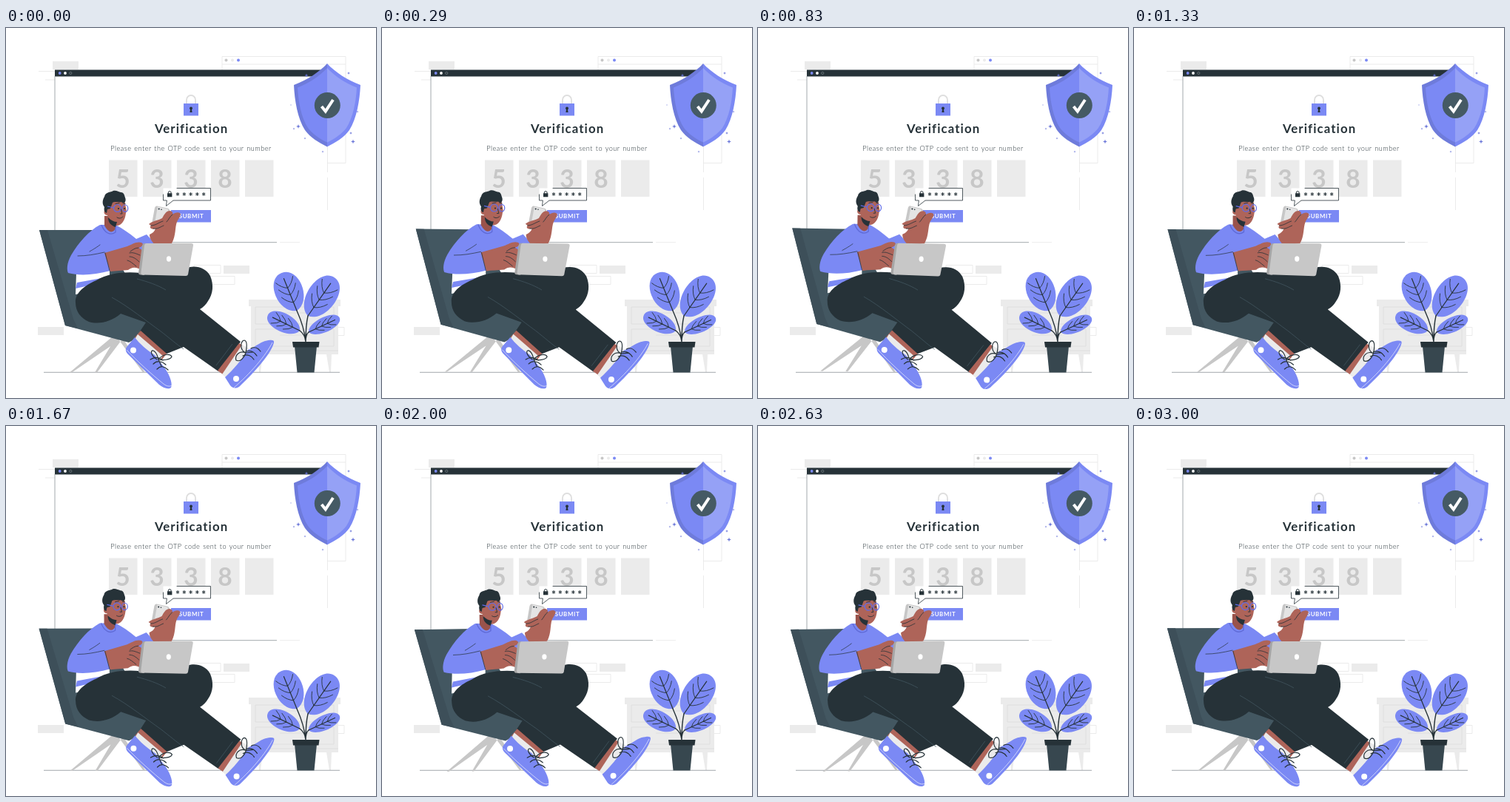
An HTML page for the animation above (3.04 s loop, 500 by 500 pixels).

```html
<!DOCTYPE html>
<html lang="en">
<head>
<meta charset="utf-8">
<title>Verification</title>
<style>
html, body { margin: 0; width: 100%; height: 100%; overflow: hidden; background: #fff; }
svg { display: block; width: 100vw; height: 100vh; font-family: Quicksand, Lato, sans-serif; }
text { text-anchor: middle; }
.blue { fill: #7b89f4; }
.dark { fill: #263238; }
.pale { fill: #ebebeb; }
.skin { fill: #ae6459; }
.slate { fill: #435761; }
.line { fill: none; stroke: #263238; stroke-linecap: round; stroke-linejoin: round; }
.thin { fill: none; stroke: #e6e6e6; stroke-width: .8; }
.title { font-size: 16.8px; font-weight: 700; letter-spacing: 1.1px; }
.hint { font-size: 9.2px; font-weight: 300; letter-spacing: .5px; word-spacing: .8px; }
.digit { font-size: 33.5px; font-weight: 700; fill: #c7c7c7; }
.submit { font-size: 7.900px; font-weight: 700; letter-spacing: .6px; fill: #fff; }
</style>
</head>
<body>
<svg viewBox="0 0 500 500">
  <!-- browser windows -->
  <path class="pale" d="M63 45h35v11H63z"/>
  <path class="thin" d="M44 58.500h22M53 70h13M292 38.500h167v144H292zM292 49h167"/>
  <circle cx="297.500" cy="43.500" r="2" fill="#c7c7c7"/>
  <circle cx="306" cy="43.500" r="2" class="pale"/>
  <circle cx="314" cy="43.500" r="2" class="blue"/>
  <path fill="#fff" d="M66 57h368v233H66z"/>
  <path class="dark" d="M66 56.500h368v9H66z"/>
  <circle cx="72.700" cy="61" r="1.900" class="blue"/>
  <circle cx="80" cy="61" r="1.900" fill="#fff"/>
  <circle cx="87.300" cy="61" r="1.600" fill="none" stroke="#7b878d" stroke-width=".7"/>
  <path d="M66 65V289.700H366" fill="none" stroke="#8b9297" stroke-width=".8"/>
  <path class="thin" d="M370 289.700H397M434.500 66V195M434.500 202V246"/>

  <!-- form -->
  <path d="M244 103V97a6 6 0 0 1 12 0v6" fill="none" stroke="#dedede" stroke-width="1.800"/>
  <path class="blue" d="M240 102h20v16.500h-20z"/>
  <path class="dark" d="M249.200 109h1.600l.8 5h-3.200z"/>
  <circle cx="250" cy="108.500" r="2" class="dark"/>
  <text class="title dark" x="250.600" y="141.500">Verification</text>
  <text class="hint dark" x="250" y="166.300">Please enter the OTP code sent to your number</text>
  <g id="code"></g>
  <path class="blue" d="M223 246h54v16.500h-54z"/>
  <text class="submit" x="250.500" y="257.200">SUBMIT</text>
  <path fill="#fff" d="M212.500 216.500h64V233H226l-9.500 7.500.8-7.500h-4.800z"/>
  <path class="line" stroke-width=".8" d="M231 216.500h45.500V233H226l-9.500 7.500.8-7.500h-4.800v-8"/>
  <path class="line" d="M219.300 224v-1.500a1.900 1.900 0 0 1 3.800 0v1.500"/>
  <path class="dark" d="M218 223.300h6.400v5H218z"/>
  <g id="stars" class="line"></g>

  <!-- shield -->
  <path fill="#6e7bdb" d="M434 48C423 60 407 70 389 77C390 98 394 122 404 138C411 148 423 155 434 160.500z"/>
  <path class="blue" d="M434 48C445 60 461 70 479 77C478 98 474 122 464 138C457 148 445 155 434 160.500z"/>
  <path class="blue" d="M434 54C424 65 410 74 394 80.500C395 100 399 121 408 135C414 143 424 150 434 154.500z"/>
  <path fill="#95a1f6" d="M434 54C444 65 458 74 474 80.500C473 100 469 121 460 135C454 143 444 150 434 154.500z"/>
  <circle cx="434.300" cy="104.500" r="17.500" fill="#455a64"/>
  <path d="M426.500 106l5.300 6.500L442 97" fill="none" stroke="#fff" stroke-width="4"/>
  <g id="sparks" fill="#6874d8"></g>

  <!-- room -->
  <path class="thin" d="M254 320.500h36v11h-36zM250 335.500h59v11h-59zM446 404.500h11v11h-11z"/>
  <path class="pale" d="M294 321h35v11h-35zM43 404h35v11H43zM328 367h124v9h-3v65H331v-65h-3zM340 441h7l-3 24h-2zM433 441h7l-1 24h-2z"/>
  <path d="M337 377h106v23H337zM337 407h106v23H337zM370 385h40M370 415h40M331 436h118" fill="none" stroke="#dcdcdc" stroke-width=".8"/>
  <path d="M51 465.300h400" stroke="#8b9297" stroke-width=".8"/>
  <g id="plant"></g>
  <path fill="#37474f" d="M390 430h30l-3.500 35.500h-23z"/>
  <path class="dark" d="M387 424h36.500l-1 7.500H388z"/>

  <g id="rock">
    <!-- chair -->
    <path fill="#c7c7c7" d="M144 417L86 465.500h3L153 422zM149 417L120 465.500h3L156 422zM150 418h7L188 465.500h-3z"/>
    <path class="slate" d="M45 273H126L190 380V412L166 425L80 402z"/>
    <path fill="#3d4f59" d="M45 273H56L91 393L97 406L80 402z"/>

    <!-- far arm with phone -->
    <path class="blue" d="M160 292L190 279L203 293L196 312H160z"/>
    <path fill="#c7c7c7" d="M204 240.500L218 243.500Q222 244.500 221 248L212 274L196 270L201 243Q202 240 204 240.500z"/>
    <path fill="#e4e4e4" d="M205 241.500L218 244.500Q220 245 219 248L211 272L200 269z"/>
    <circle cx="206.700" cy="244.500" r="1.100" class="dark"/>
    <circle cx="210" cy="245.300" r=".8" class="dark"/>
    <path class="skin" d="M193 265C197 261 206 260 211 257C214 252 216 247 222 247C225 248 226 250 225 252C229 249 235 248 236 252C235 256 232 259 231 262C228 270 230 280 224 291L202 294C197 288 194 285 194 279C199 277 201 274 202 271C197 273 193 270 196 267z"/>
    <path class="line" d="M196 267C202 267 206 263 212 261M199 271C205 272 208 269 213 267M225 252C221 255 220 259 217 262" stroke-width=".8"/>

    <!-- torso and head -->
    <path fill="#fff" d="M95 331L140 325V352L94 360z"/>
    <path class="blue" d="M96 344L140 336V342L94 352z"/>
    <path class="blue" d="M127 266C112 274 98 290 88 307C82 318 82 327 84 331C99 335 119 334 141 328L188 318L192 294L176 285C166 277 158 271 148 266z"/>
    <path fill="#9a534b" d="M133 254H149L148 271C145 277 139 278 133 267z"/>
    <path d="M129 266C133 277 141 281 148 276V268" fill="none" stroke="#5e6ad7" stroke-width="1.300"/>
    <path class="skin" d="M137 237C145 231 157 231 161 236C161 241 164 247 162 250C161 260 156 267 150 267C143 267 138 260 137 253C132 253 131 247 135 245z"/>
    <path class="dark" d="M138 256C142 260 146 262 150 262L148 269C142 267 138 263 138 256z"/>
    <path class="dark" d="M133 242C129 237 131 231 133 228C134 222 140 222 143 221C147 218 152 221 155 222C160 222 160 227 161 229C163 234 160 239 156 235C152 236 147 234 144 236L141 244L137 245L136 250C133 249 132 246 133 242z"/>
    <g fill="none" stroke="#5f6be8" stroke-width="1.200">
      <circle cx="150.500" cy="243.500" r="5"/>
      <ellipse cx="161" cy="243.700" rx="3.800" ry="4.700"/>
      <path d="M145.500 243L137 241"/>
    </g>
    <circle cx="152" cy="244" r="1.100" class="dark"/>
    <circle cx="160" cy="244" r="1.100" class="dark"/>
    <path class="line" d="M148 237.500L153 236.500M158 237L161 237.500M155.500 245L157 251L154.500 251M150 256C153 258 156 257 158 255" stroke-width=".9"/>

    <!-- legs -->
    <path class="dark" d="M182 331L244 324C257 320 270 324 276 335C281 347 280 359 273 369Q269 376 262 380L317 424L287 464L240 431L215 441L181 410L189 398L155 386C142 397 126 401 112 397C101 392 94 383 94 371C93 358 106 348 122 341C139 331 160 329 182 331z"/>
    <path d="M143 364C165 376 191 397 208 409C221 419 230 427 240 434M177 339C192 343 204 347 216 354M306 427L284 456" fill="none" stroke="#455a64" stroke-width=".7"/>

    <!-- near arm and laptop -->
    <path class="skin" d="M133 304L164 295C171 292 177 288 183 290C187 292 184 296 179 297C186 300 188 306 186 310L184 328C176 322 170 323 165 327C157 328 148 328 141 329z"/>
    <path class="line" d="M179 297C174 297 171 300 168 302M181 307C174 304 171 303 167 304M180 316C175 311 171 309 167 309M176 322C171 318 168 315 164 314M134 304L140 328" stroke-width=".8"/>
    <path class="line" d="M97 308C109 308 120 306 133 303M113 302C120 298 123 296 127 293" stroke-width=".7"/>
    <path fill="#a6a6a6" d="M190 291H187Q185 291 184 294L179 331Q179 333 182 333.500L187 334z"/>
    <path fill="#c7c7c7" d="M190 291H250Q253.500 291 253 294L246 333Q245.500 335 243 335L184 333.500Q182 333 182.500 330L187 294Q187.500 291 190 291z"/>
    <ellipse cx="220" cy="312" rx="3.100" ry="3.700" fill="#fff"/>

    <!-- shoes -->
    <path class="skin" d="M182 409L217 440L211 448L174 418z"/>
    <path fill="#ebebeb" d="M178 414L212 443L204 455L172 424z"/>
    <path class="blue" d="M174 418C180 426 190 435 201 442L215 460C223 472 225 482 223 486C219 489 212 486 207 482L165 441C161 437 161 433 164 430z"/>
    <path d="M163 435C177 450 198 469 213 481C217 484 221 485 224 483" fill="none" stroke="#fff" stroke-width=".6"/>
    <circle cx="172" cy="435.500" r="4" fill="#fff"/>
    <path class="line" d="M195 448C201 444 207 445 212 449M199 454C204 449 211 450 216 455M204 461C209 456 214 457 219 462M204 448C195 442 195 435 199 436C204 438 205 445 206 448C212 440 222 440 224 444C222 449 211 449 206 448L210 457" stroke-width="1.200"/>

    <path class="skin" d="M315 426L320 429L293 468L286 463z"/>
    <path fill="#ebebeb" d="M319 428L330 434L301 475L292 468z"/>
    <path class="blue" d="M327 435C335 432 343 425 350 423C358 421 363 421 362 425C359 439 338 463 316 484C311 488 306 487 303 483L296 472C307 462 318 449 327 435z"/>
    <path d="M308 486C329 468 351 443 360 425" fill="none" stroke="#fff" stroke-width=".6"/>
    <circle cx="311" cy="474" r="4" fill="#fff"/>
    <path class="line" d="M320 443C326 440 332 443 335 448M324 437C330 435 335 437 339 443M331 433C336 430 341 433 344 437M324 439C315 435 317 422 322 422C327 423 325 434 324 439C315 435 309 443 311 449C317 452 322 445 324 439L334 438" stroke-width="1.200"/>
  </g>
</svg>
<script>
const $ = id => document.getElementById(id);

$("code").innerHTML = ["5", "3", "3", "8", ""].map((digit, i) => {
  const x = 139 + 46 * i;
  return `<path class="pale" d="M${x} 178.500h38.500V228h-38.500z"/>
    <text class="digit" x="${x + 19}" y="215.800">${digit}</text>`;
}).join("");

$("stars").innerHTML = [0, 1, 2, 3, 4].map(i =>
  `<path transform="translate(${232 + 8.8 * i} 224.500)" d="M0-2V2M-1.800-1L1.800 1M-1.800 1L1.800-1"/>`
).join("");

const spark = ([x, y, r]) =>
  `<path transform="translate(${x} ${y}) scale(${r})" d="M0-1L.25-.25L1 0L.25.25L0 1L-.25.25L-1 0L-.25-.25z"/>`;
$("sparks").innerHTML = [
  [463, 61, 2], [406, 64, 2.5], [475, 113, 1.5], [466, 142, 2], [469, 153.5, 3],
  [395, 133, 3], [389, 136, 1.5], [404, 149, 1.5], [428, 167, 1.5], [385, 104, 1]
].map(spark).join("");

// A leaf grows from its base (x, y) along the given angle.
function leaf(x, y, angle, len, half) {
  const w = half / .75;
  let veins = "";
  for (const k of [.22, .42, .6]) {
    for (const side of [-1, 1]) {
      const reach = side * half * .65;
      veins += `M0 ${-len * k}Q${reach * .6} ${-len * (k + .06)} ${reach} ${-len * (k + .22)}`;
    }
  }
  return `<g transform="translate(${x} ${y}) rotate(${angle})">
    <path class="blue" d="M0 0C${-w} ${-len * .1} ${-w} ${-len} 0 ${-len}C${w} ${-len} ${w} ${-len * .1} 0 0"/>
    <path class="line" stroke-width=".8" d="${veins}"/>
    <path class="line" stroke-width="1.200" d="M0 0V${-len * .85}"/></g>`;
}
$("plant").innerHTML =
  leaf(393, 382, -22, 55, 19) + leaf(408, 389, 35, 63, 19.5) +
  leaf(397, 409, -64, 48, 12.5) + leaf(409, 411, 65, 46, 10) +
  `<path class="line" stroke-width="1.400" d="M393 382Q403 404 405 424Q405 402 408 389M397 409Q404 414 405 424Q405 414 409 411"/>`;

const LOOP = 3040, SWAY = .9;
function draw() {
  const turn = performance.now() % LOOP / LOOP * 2 * Math.PI;
  $("rock").setAttribute("transform", `rotate(${SWAY * Math.sin(turn)} 208 355)`);
  requestAnimationFrame(draw);
}
draw();
</script>
</body>
</html>
```
